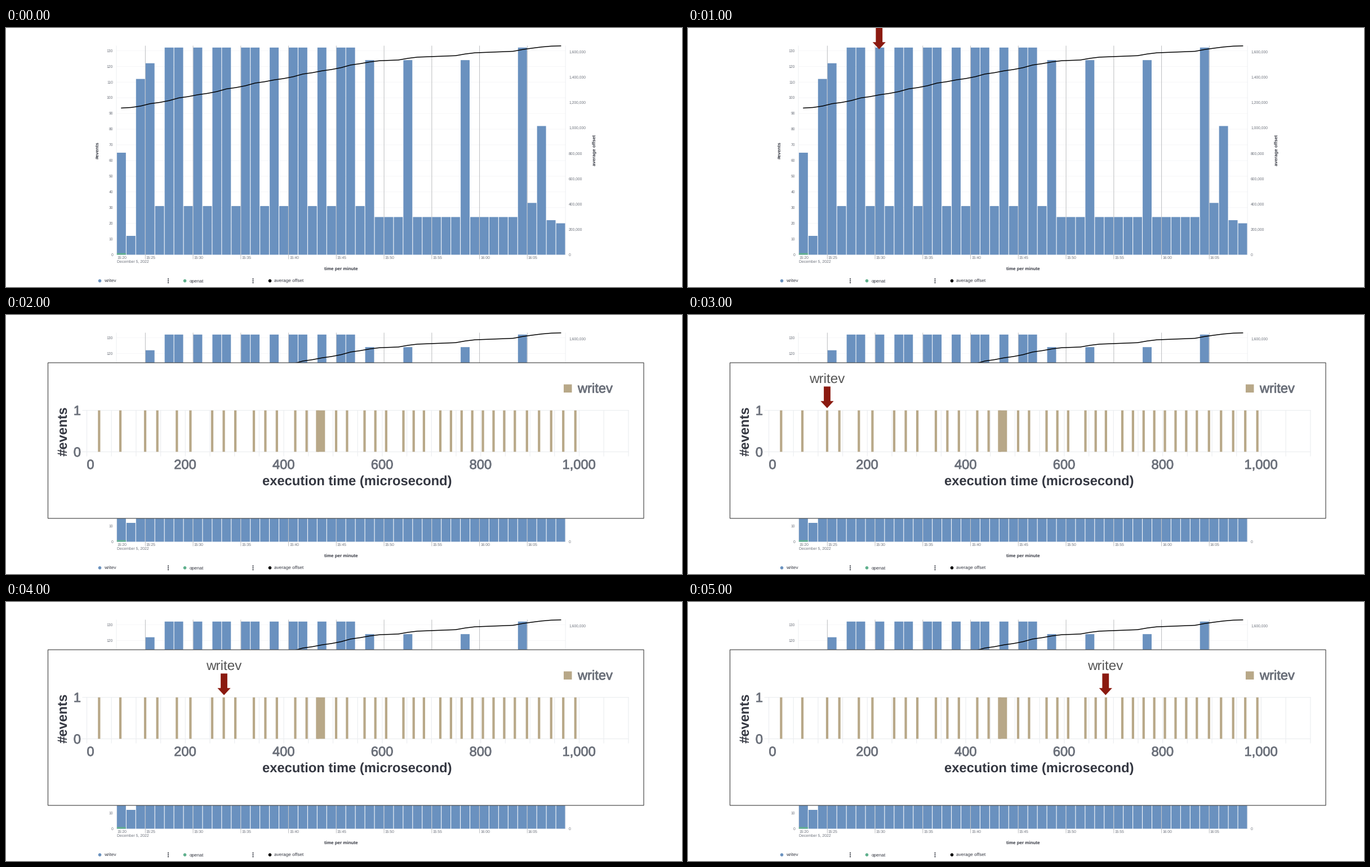
A matplotlib script that plays this animation: 1200x461 px, repeating every 6 s.

```python
import matplotlib.pyplot as plt
import numpy as np
from matplotlib.animation import FuncAnimation
from matplotlib.patches import Circle, Polygon, Rectangle
from matplotlib.patheffects import withStroke

W, H, DPI = 1200, 461, 100
BLUE, GREEN, TAN, RED = "#6a91bf", "#5fb08d", "#b8a888", "#8b1a10"
MUTED, DARK, GRID = "#6c717b", "#343741", "#eceef1"

plt.rcParams.update({"font.family": "Liberation Sans", "text.hinting": "none"})
fig = plt.figure(figsize=(W / DPI, H / DPI), dpi=DPI, facecolor="white")
ax = fig.add_axes([0, 0, 1, 1])
ax.set(xlim=(0, W), ylim=(H, 0))
ax.axis("off")


def px(size):
    """Convert pixels to points."""
    return size * 72 / DPI


def text(x, y, label, size, color=MUTED, ha="left", z=3, **style):
    return ax.text(x, y, label, fontsize=px(size), color=color, ha=ha,
                   va="baseline", zorder=z, **style)


def side_text(x, y, label, size, z=3):
    ax.text(x, y, label, fontsize=px(size), color=DARK, rotation=90, ha="center",
            va="center", fontweight="bold", zorder=z)


def medium_text(x, y, label, ha):
    """Overlay label with a weight between regular and bold."""
    text(x, y, label, 23.7, MUTED, ha, 12,
         path_effects=[withStroke(linewidth=px(0.8), foreground=MUTED)])


def rect(x0, y0, x1, y1, color, z=2, **style):
    style = {"ec": "none", **style}
    ax.add_patch(Rectangle((x0, y0), x1 - x0, y1 - y0, fc=color, zorder=z,
                           snap=False, **style))


def line(xs, ys, color, width=1.0, z=1):
    ax.plot(xs, ys, color=color, lw=px(width), zorder=z, snap=False)


def dot(x, y, radius, color):
    ax.add_patch(Circle((x, y), radius, color=color, lw=0, zorder=3))


# Background chart: bursts come about every 1.6 minutes, later every 6
LEFT, STEP, BASE, UNIT, COUNT = 196.5, 16.95, 403.5, 2.793, 47
RIGHT = LEFT + COUNT * STEP
minute = np.arange(COUNT)
bursts = [int(2.1 + 1.61 * k) for k in range(16)] + [30, 36, 42]
events = np.where(minute < 26, 31, 24)
events[bursts] = np.where(minute[bursts] < 25, 132, 124)
events[:4] = 65, 12, 112, 122
events[-5:] = 132, 33, 82, 22, 20

# The average offset climbs with the activity of neighbouring minutes
climb = 0.0144 * events[:-1] + 0.0234 * events[1:] - 0.25
offset_y = 31.8 + np.append(np.cumsum(climb[::-1])[::-1], 0)

for value in range(0, 131, 10):
    y = BASE - value * UNIT
    line([LEFT, RIGHT], [y, y], "#f4f5f7", 0.8, 0.5)
    text(190, y + 2.2, str(value), 6.8, ha="right")
for x in (LEFT - 0.5, RIGHT):
    line([x, x], [32, BASE], GRID, 0.9, 0.5)
for i, value in enumerate(events):
    x = LEFT + i * STEP
    rect(x + 0.4, BASE - value * UNIT, x + 16.3, BASE, BLUE)
rect(LEFT + 0.4, BASE - UNIT, LEFT + 16.3, BASE, GREEN, 2.1)
line(LEFT + (minute + 0.5) * STEP, offset_y, "black", 1.5, 3)

for i in range(9):
    x = LEFT + (3 + 5 * i) * STEP
    line([x, x], [32, 411], "#bcbdc0")
    hours, minutes = divmod(15 * 60 + 25 + 5 * i, 60)
    text(x + 1.4, 410.6, f"{hours}:{minutes:02d}", 6.8)
    text(999, 406.3 - 45.15 * i, f"{200000 * i:,}", 6.8)
text(197, 410.6, "15:20", 6.8)
text(197, 417.3, "December 5, 2022", 6.85)
text(594.5, 431.2, "time per minute", 7.95, DARK, "center", fontweight="bold")
side_text(163, 217.5, "#events", 8.3)
side_text(1045.5, 217.5, "average offset", 8.1)

for i, (color, label) in enumerate(((BLUE, "writev"), (GREEN, "openat"),
                                    ("black", "average offset"))):
    x = 166.5 + 151 * i
    dot(x, 450, 2.8, color)
    text(x + 7.7, 452.2, label, 8.3, DARK)
for x in (288, 438.5):
    for y in (446.7, 450, 453.3):
        dot(x, y, 1.1, DARK)

# Overlay chart: execution times
background = set(ax.get_children())
rect(74.5, 85, 1132.1, 362, "white", 10, ec="#4a4a4a", lw=px(1.2))
ORIGIN, TICK, TOP, BOTTOM = 143.5, 43.7, 169.8, 243.5
for y in (TOP, BOTTOM):
    line([136, ORIGIN + 22 * TICK], [y, y], GRID, 1.2, 11)
for i in range(23):
    x = ORIGIN + i * TICK
    line([x, x], [TOP, 251], GRID, 1.2, 11)

# Calls arrive in short runs with a pause after each, then in a steady stream
run_starts = [165.3, 203, 247, 303.3, 366, 440, 513.5, 586, 636.5, 705.5, 771]
calls = [*np.linspace(771, 903.3, 8), *np.linspace(903.3, 1010.7, 6)[1:]]
for start, end in zip(run_starts, run_starts[1:]):
    size = int((end - start) / 19 - 0.4)
    gap = (end - start) / (size + 0.6)
    calls += [start + gap * k for k in range(size)]
for x in calls:
    rect(x - 2.1, TOP, x + 2.1, BOTTOM, TAN, 12)
rect(550.3, TOP, 566.3, BOTTOM, TAN, 12)

medium_text(150, 274, "0", "center")
for i in range(1, 6):
    medium_text(ORIGIN + 4 * TICK * i - 0.3, 274, f"{200 * i:,}", "center")
medium_text(133, 178, "1", "right")
medium_text(133, 252, "0", "right")
text(623.7, 303.5, "execution time (microsecond)", 23.7, DARK, "center", 12,
     fontweight="bold")
side_text(102.5, 206.7, "#events", 23.7, 12)
rect(990, 123.5, 1004.5, 138, TAN, 12)
medium_text(1015, 138.3, "writev", "left")
overlay = [a for a in ax.get_children() if a not in background]

# Pointer: an arrow with a caption over the overlay chart
pointer = ax.add_patch(Polygon([(0, 0), (1, 0), (1, 1)], fc=RED, ec="none", zorder=20))
caption = text(0, 120.3, "writev", 24.2, "#555555", "center", 20)
pointer_x = {1: 339.3, 3: 247, 4: 387, 5: 741.3}


def update(second):
    zoomed = second >= 2
    pointing = second in pointer_x
    for artist in overlay:
        artist.set_visible(zoomed)
    pointer.set_visible(pointing)
    caption.set_visible(pointing and zoomed)
    if pointing:
        x = pointer_x[second]
        tip, tail = (165.8, 127.3) if zoomed else (37.8, -2)
        neck = tip - 12.6
        pointer.set_xy([(x - 5.9, tail), (x + 5.9, tail), (x + 5.9, neck),
                        (x + 11.6, neck), (x, tip), (x - 11.6, neck), (x - 5.9, neck)])
        caption.set_x(x - 0.5)
    return [*overlay, pointer, caption]


anim = FuncAnimation(fig, update, frames=6, interval=1000, repeat=True,
                     repeat_delay=0, blit=False)
plt.show()
```
